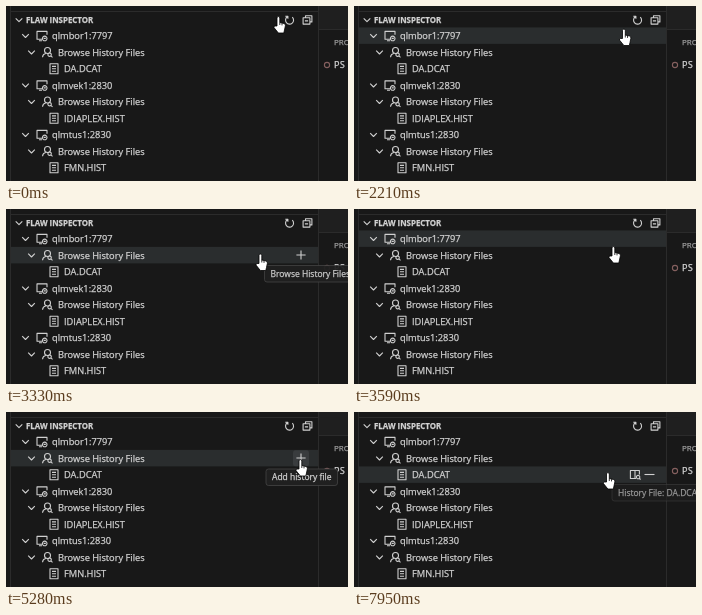
Recreate the animation shown at these times as an HTML page with a canvas. Size 342 by 175 pixels, loop 8 s.

```html
<!DOCTYPE html>
<html lang="en">
<head>
<meta charset="utf-8">
<title>Tree view hover</title>
<style>
html, body { margin: 0; width: 100%; height: 100%; overflow: hidden; background: #181818; }
canvas { display: block; width: 342px; height: 175px; }
</style>
</head>
<body>
<canvas></canvas>
<script>
const W = 342, H = 175, LOOP = 8000, ROW = 16.5, TOP = 21.4;
const canvas = document.querySelector('canvas');
const c = canvas.getContext('2d');
const dpr = window.devicePixelRatio || 1;
canvas.width = W * dpr;
canvas.height = H * dpr;

const SANS = '"Open Sans", "Noto Sans", sans-serif';
const hosts = [['qlmbor1:7797', 'DA.DCAT'], ['qlmvek1:2830', 'IDIAPLEX.HIST'], ['qlmtus1:2830', 'FMN.HIST']];

// Pointer moves: start, end, steps, x, y
const moves = [
  [90, 340, 5, 282, 12], [1270, 1270, 1, 282, 11],
  [1860, 2610, 12, 247, 34], [2680, 2680, 1, 247, 35], [2750, 2750, 1, 247, 38],
  [2810, 2940, 3, 248, 46], [3270, 3590, 6, 254, 37], [3670, 4020, 6, 279, 46],
  [4090, 4090, 1, 279, 45], [4290, 4420, 3, 290, 49], [5280, 5280, 1, 289, 47],
  [6230, 6230, 1, 290, 48], [6820, 7030, 4, 266, 52], [7100, 7550, 8, 247, 59.5],
  [7950, 7950, 1, 248.5, 60]
];

// Tooltips: text, x, y, fade in from/to, fade out from/to
const tips = [
  ['Refresh', 263, 24, 670, 740, 1860, 1990],
  ['Flaw Inspector Connection', 262, 39, 2680, 2750, 2790, 2880],
  ['Browse History Files', 258, 56, 3270, 3340, 3460, 3590],
  ['Browse History Files', 291, 56, 3950, 4020, 4270, 4420],
  ['Add history file', 259.5, 56.5, 4820, 4950, 6820, 6890],
  ['History File: DA.DCAT', 257.5, 72, 7950, 8080, 9000, 9100]
];

const hand = new Path2D('M4 10V2a1.4 1.4 0 0 1 2.8 0V6.5l4.2 1q1.6.5 1.4 2.2L11.5 14 10.8 17H5.4L1 11.6Q.6 10.2 2 10Z');
const icons = {
  chevron: 'M-3.3-1.6L0 1.7 3.3-1.6',
  host: 'M0 3.4H-5V-4.4H5V-1M-3 5H0M5 2.6a2.3 2.3 0 1 1-4.6 0a2.3 2.3 0 1 1 4.6 0M1.6 2.6H3.8',
  browse: 'M3-1.8a3 3 0 1 1-6 0a3 3 0 1 1 6 0M-5 5Q-4.6 1.6-1.8 1.2M3.8 2.4a1.7 1.7 0 1 1-3.4 0a1.7 1.7 0 1 1 3.4 0M3.4 3.6L5 5',
  file: 'M-4-5H4V5H-4ZM-2-2.4H2M-2 0H2M-2 2.4H2',
  refresh: 'M2.8-2.8A4 4 0 1 1-2.2-3.2M-4.2-3.8H-1.6V-1.2',
  collapse: 'M-2-2V-4H4.4V2.2H2.4M-4.4-2H2.4V4.4H-4.4ZM-2.6 1.2H.6',
  plus: 'M-4.6 0H4.6M0-4.6V4.6',
  minus: 'M-5 0H5',
  view: 'M1 4H-4.6V-4H4.4V0M0-4V4M4.8 2.6a1.7 1.7 0 1 1-3.4 0a1.7 1.7 0 1 1 3.4 0M4.4 3.8L5.6 5'
};
for (const k in icons) icons[k] = new Path2D(icons[k]);

function icon(name, x, y, color = '#d0d0d0') {
  c.save();
  c.translate(x, y);
  c.strokeStyle = color;
  c.lineWidth = 1.1;
  c.stroke(icons[name]);
  c.restore();
}

// A thin outline gives the strokes the weight of hinted screen text
function text(str, x, y, size = 9.27, color = '#d2d2d2', weight = 400, family = SANS) {
  c.font = `${weight} ${size}px ${family}`;
  c.fillStyle = c.strokeStyle = color;
  c.lineWidth = 0.25;
  c.lineJoin = 'round';
  c.fillText(str, x, y);
  c.strokeText(str, x, y);
}

function rect(x, y, w, h, color) {
  c.fillStyle = color;
  c.fillRect(x, y, w, h);
}

function box(x, y, w, h, fill, stroke) {
  c.beginPath();
  c.roundRect(x, y, w, h, 2.5);
  c.fillStyle = fill;
  c.fill();
  if (!stroke) return;
  c.strokeStyle = stroke;
  c.lineWidth = 0.8;
  c.stroke();
}

function pointer(t) {
  let x = 267, y = 10;
  for (const [start, end, n, tx, ty] of moves) {
    if (t < start) break;
    const done = n === 1 ? 1 : Math.min(n, Math.floor((t - start) / (end - start) * (n - 1)) + 1) / n;
    x += (tx - x) * done;
    y += (ty - y) * done;
  }
  return [x, y];
}

function drawPanels() {
  rect(0, 0, W, H, '#181818');
  rect(313, 0, 29, 23, '#1f1f1f');
  rect(313, 23, 29, 1, '#2b2b2b');
  rect(312, 0, 1, H, '#2b2b2b');
  rect(4, 0, 1, H, '#2b2b2b');
  rect(5, 5, 307, 1, '#2b2b2b');
  text('PROBLEMS', 328, 39.3, 8, '#9d9d9d');
  text('PS', 328, 62.3, 9.2, '#d2d2d2', 500, '"Noto Sans Mono", "DejaVu Sans Mono", monospace');
  c.beginPath();
  c.arc(321, 59, 2.6, 0, 7);
  c.strokeStyle = '#85605f';
  c.lineWidth = 1.1;
  c.stroke();
}

function drawTree(hotX, hotY) {
  const over = Math.floor((hotY - TOP) / ROW);
  if (over >= 0) rect(5, TOP + over * ROW, 307, ROW, '#2a2d2e');
  if (over < 0 && hotX > 275 && hotX < 291) box(275, 6, 16, 16, '#2d2f31');
  if (over === 1 && hotX > 287 && hotX < 303) box(287, 38.2, 16, 16, '#393c3e');

  icon('chevron', 13, 14);
  text('FLAW INSPECTOR', 20, 16.8, 7.9, '#d2d2d2', 700);
  icon('refresh', 283.5, 14);
  icon('collapse', 301.5, 13.7);

  hosts.forEach(([host, file], i) => {
    const y = 29.8 + i * 3 * ROW;
    icon('chevron', 19.5, y);
    icon('host', 36, y);
    text(host, 46, y + 3.3);
    icon('chevron', 25.5, y + ROW);
    icon('browse', 41.5, y + ROW);
    text('Browse History Files', 52, y + ROW + 3.3);
    icon('file', 48, y + 2 * ROW);
    text(file, 58, y + 2 * ROW + 3.3);
  });

  if (over === 1) icon('plus', 295, 46);
  if (over === 2) {
    icon('view', 281, 62.5);
    icon('minus', 295.5, 62.5);
  }
}

function drawTips(t) {
  for (const [str, x, y, in0, in1, out0, out1] of tips) {
    if (t < in0 || t >= out1) continue;
    c.globalAlpha = Math.min(1, 0.6 + 0.4 * (t - in0) / (in1 - in0), (out1 - t) / (out1 - out0));
    c.font = `8.5px ${SANS}`;
    box(x + 0.5, y + 0.5, c.measureText(str).width + 12, 16.5, '#202020', '#454545');
    text(str, x + 6.5, y + 11.7, 8.5);
    c.globalAlpha = 1;
  }
}

function drawPointer(x, y) {
  c.save();
  c.translate(x, y);
  c.fillStyle = '#fff';
  c.fill(hand);
  c.strokeStyle = '#000';
  c.lineWidth = 0.8;
  c.stroke(hand);
  c.beginPath();
  c.moveTo(6.8, 6.5);
  c.lineTo(6.8, 9);
  c.moveTo(9, 7.2);
  c.lineTo(9, 9.4);
  c.stroke();
  c.restore();
}

const begin = performance.now();
function draw() {
  const t = (performance.now() - begin) % LOOP;
  const [x, y] = pointer(t);
  c.setTransform(dpr, 0, 0, dpr, 0, 0);
  drawPanels();
  drawTree(x + 5, y + 0.5);
  drawTips(t);
  drawPointer(x, y);
  requestAnimationFrame(draw);
}
draw();
</script>
</body>
</html>
```
